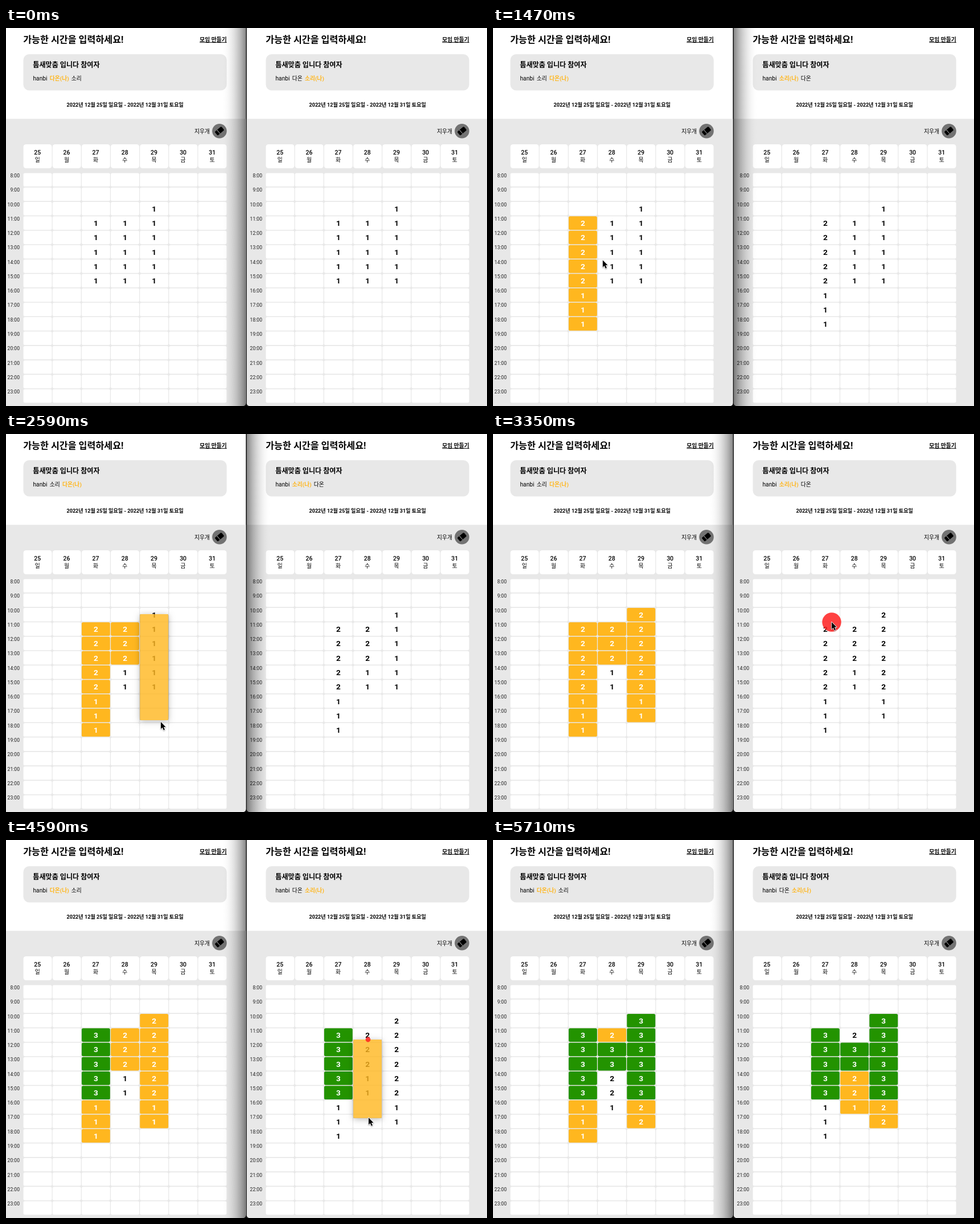
Recreate the animation shown at these times as an HTML page with a canvas. Size 845 by 663 pixels, loop 7000 ms.

```html
<!DOCTYPE html>
<html lang="ko">
<head>
<meta charset="utf-8">
<title>시간 입력</title>
<style>
  html, body { margin: 0; width: 100%; height: 100%; overflow: hidden; background: #000; }
  canvas { display: block; width: 845px; height: 663px; }
</style>
</head>
<body>
<canvas id="stage"></canvas>
<script>
const WIDTH = 845, HEIGHT = 663, LOOP = 7000;
const START = 180, STEP = 1000 / 17;
const YELLOW = '#ffb71f', GREEN = '#239300', GRAY = '#e8e8e8';
const FONT = 'Roboto, "Noto Sans CJK KR", "Noto Sans CJK", sans-serif';
const WINDOW_SHIFT = 426;
const GRID = { x: 30.6, y: 254.4, dx: 51.17, dy: 25.27, w: 49.9, h: 23.7 };
const DAYS = '일월화수목금토';
const NAMES = { first: 'hanbi', left: '다온', right: '소리' };

// Cells already chosen by the third participant: column -> [first row, last row]
const BASE = { 2: [3, 7], 3: [3, 7], 4: [2, 7] };

// drop: own window shows the choice, seen: the other window does
const DRAGS = [
  { win: 0, col: 2, rows: [3, 10], x: 161, y: 324, press: 820, move: 1090, drop: 1320, seen: 1380 },
  { win: 0, col: 3, rows: [3, 5], x: 211, y: 330, press: 1700, move: 1760, drop: 1915, seen: 1975 },
  { win: 0, col: 4, rows: [2, 9], x: 261, y: 316, press: 2290, move: 2370, drop: 2620, seen: 2680 },
  { win: 1, col: 2, rows: [3, 7], x: 595, y: 330, press: 3335, move: 3430, drop: 3910, seen: 3910 },
  { win: 1, col: 3, rows: [4, 8], x: 636, y: 350, press: 4365, move: 4420, drop: 4620, seen: 4680 },
  { win: 1, col: 4, rows: [2, 9], x: 686, y: 303, press: 4990, move: 5060, drop: 5320, seen: 5260 },
];

// Pointer path: time, x, y
const PATH = [
  [150, 425, 620], [760, 161, 324], [1000, 161, 324], [1062, 161, 336], [1260, 160, 529],
  [1340, 162, 528], [1570, 211, 336], [1650, 211, 330], [1740, 211, 330], [1880, 213, 408],
  [1945, 213, 410], [2050, 218, 418], [2260, 261, 316], [2340, 261, 317], [2592, 272, 505],
  [2650, 275, 503], [2840, 780, 246], [3040, 600, 322], [3120, 595, 329], [3400, 595, 330],
  [3700, 596, 458], [3880, 598, 460], [4200, 636, 352], [4400, 636, 350], [4520, 637, 491],
  [4591, 637, 487], [4640, 638, 486], [4930, 686, 303], [5040, 686, 303], [5230, 688, 503],
  [5330, 689, 503], [5650, 416, 622],
];
const POINTER_SHOWN = [150, 5680];
const NAMES_SWAPPED = [1320, 3910];
const LEFT_IN_FRONT = [820, 3335];
const RIPPLE = { life: 300, radius: 18 };

const canvas = document.getElementById('stage');
const ctx = canvas.getContext('2d');
const scale = window.devicePixelRatio || 1;
canvas.width = WIDTH * scale;
canvas.height = HEIGHT * scale;

const within = (t, [from, to]) => t >= from && t < to;
const hasRow = (rows, row) => !!rows && row >= rows[0] && row <= rows[1];

function box(x, y, w, h, r, color) {
  ctx.fillStyle = color;
  ctx.beginPath();
  ctx.roundRect(x, y, w, h, r);
  ctx.fill();
}

function disc(x, y, r, color) {
  ctx.fillStyle = color;
  ctx.beginPath();
  ctx.arc(x, y, r, 0, Math.PI * 2);
  ctx.fill();
}

function text(str, x, y, size, weight = 400, align = 'left', color = '#000') {
  ctx.font = `${weight} ${size}px ${FONT}`;
  ctx.textAlign = align;
  ctx.fillStyle = color;
  ctx.fillText(str, x, y);
  return ctx.measureText(str).width;
}

function pointerAt(t) {
  const i = PATH.findIndex(p => p[0] > t);
  if (i < 0) return PATH[PATH.length - 1].slice(1);
  if (i === 0) return PATH[0].slice(1);
  const [t0, x0, y0] = PATH[i - 1], [t1, x1, y1] = PATH[i];
  const k = (1 - Math.cos(Math.PI * (t - t0) / (t1 - t0))) / 2;
  return [x0 + (x1 - x0) * k, y0 + (y1 - y0) * k];
}

function drawNames(win, t) {
  const me = win ? 'right' : 'left';
  const order = within(t, NAMES_SWAPPED) ? ['right', 'left'] : ['left', 'right'];
  let x = 47.5;
  for (const key of ['first', ...order]) {
    const mine = key === me;
    x += 4.2 + text(NAMES[key] + (mine ? '(나)' : ''), x, 92, key === 'first' ? 10.2 : 9.8,
      mine ? 700 : 400, 'left', mine ? YELLOW : '#000');
  }
}

function drawEraser() {
  text('지우개', 358, 184.8, 9.8, 400, 'right');
  disc(375, 180.7, 12.8, '#737373');
  ctx.save();
  ctx.translate(375, 180.7);
  ctx.rotate(-0.7);
  box(-7.6, -4.2, 15.2, 8.4, 1.6, '#000');
  ctx.fillStyle = '#a5a5a5';
  ctx.fillRect(-2.6, -4.2, 0.9, 8.4);
  ctx.restore();
}

function drawCell(win, col, row, t) {
  const x = GRID.x + col * GRID.dx, y = GRID.y + row * GRID.dy;
  let count = hasRow(BASE[col], row) ? 1 : 0, mine = false;
  for (const d of DRAGS) {
    const shown = t >= (d.win === win ? d.drop : d.seen);
    if (!shown || d.col !== col || !hasRow(d.rows, row)) continue;
    count++;
    mine = mine || d.win === win;
  }
  const fill = count === 3 ? GREEN : mine ? YELLOW : '#fff';
  box(x, y, GRID.w, GRID.h, 2.6, fill);
  if (count) {
    text(count, x + GRID.w / 2, y + 17, 13.6, 700, 'center', fill === '#fff' ? '#000' : '#fff');
  }
}

function drawWindow(win, t) {
  ctx.save();
  ctx.translate(win * WINDOW_SHIFT, 0);
  ctx.beginPath();
  if (win) ctx.roundRect(-3, -20, 460, HEIGHT + 20, 5);
  else ctx.roundRect(-20, -20, 441.4, HEIGHT + 20, 5);
  ctx.clip();
  ctx.fillStyle = '#fff';
  ctx.fillRect(-20, 0, 480, HEIGHT);
  ctx.fillStyle = GRAY;
  ctx.fillRect(-20, 159.3, 480, HEIGHT);

  text('가능한 시간을 입력하세요!', 30.2, 26, 16.2, 700);
  const linkWidth = text('모임 만들기', 387.8, 23.8, 9.8, 700, 'right');
  ctx.fillRect(387.8 - linkWidth, 24.8, linkWidth, 1);
  box(30.5, 46, 357.2, 63.5, 10, GRAY);
  text('틈새맞춤 입니다 참여자', 47.3, 69, 12.1, 700);
  drawNames(win, t);
  text('2022년 12월 25일 일요일 - 2022년 12월 31일 토요일', 209.2, 137.6, 9.1, 700, 'center');
  drawEraser();

  for (let col = 0; col < 7; col++) {
    const x = GRID.x + col * GRID.dx, mid = x + GRID.w / 2 - 0.3;
    box(x, 204, GRID.w, 42, 4.5, '#fff');
    text(25 + col, mid, 222, 10.5, 500, 'center');
    text(DAYS[col], mid, 234.6, 9.8, 500, 'center');
    for (let row = 0; row < 16; row++) drawCell(win, col, row, t);
  }
  for (let row = 0; row < 16; row++) {
    text(`${8 + row}:00`, 24, 262 + row * GRID.dy, 8.6, 400, 'right', '#222');
  }
  ctx.restore();
}

// The front window casts its shadow over the other one.
function drawWindowShadow(leftInFront) {
  const reach = 42, edge = leftInFront ? 423 : 421.4, far = edge + (leftInFront ? reach : -reach);
  const shade = ctx.createLinearGradient(edge, 0, far, 0);
  for (let k = 0; k <= 8; k++) {
    shade.addColorStop(k / 8, `rgba(0,0,0,${0.47 * (1 - k / 8) ** 2})`);
  }
  ctx.fillStyle = shade;
  ctx.fillRect(Math.min(edge, far), 0, reach, HEIGHT);
}

function drawSelection(d, t) {
  if (!within(t, [d.move, d.drop])) return;
  const x = GRID.x + d.col * GRID.dx + d.win * WINDOW_SHIFT;
  const h = Math.max(2, pointerAt(t - 20)[1] - d.y);
  ctx.save();
  ctx.beginPath();
  ctx.rect(0, 0, WIDTH, HEIGHT);
  ctx.roundRect(x, d.y, GRID.w, h, 2);
  ctx.clip('evenodd');
  ctx.shadowColor = 'rgba(0,0,0,.27)';
  ctx.shadowBlur = 11 * scale;
  ctx.shadowOffsetY = 2 * scale;
  box(x, d.y, GRID.w, h, 2, '#000');
  ctx.restore();
  ctx.globalAlpha = 0.8;
  box(x, d.y, GRID.w, h, 2, YELLOW);
  ctx.globalAlpha = 1;
}

function drawRipple(d, t) {
  const k = (t - d.press) / RIPPLE.life;
  if (k >= 0 && k < 1) disc(d.x, d.y, RIPPLE.radius * (1 - k), 'rgba(255,34,34,.86)');
}

const arrow = new Path2D('M0 0V12.2L2.8 9.7L4.9 14.5L7 13.6L4.9 8.9H8.6Z');

function drawPointer(t) {
  if (!within(t, POINTER_SHOWN)) return;
  ctx.save();
  ctx.translate(...pointerAt(t));
  ctx.lineWidth = 1.6;
  ctx.lineJoin = 'round';
  ctx.strokeStyle = '#fff';
  ctx.shadowColor = 'rgba(0,0,0,.35)';
  ctx.shadowBlur = 2 * scale;
  ctx.shadowOffsetY = scale;
  ctx.stroke(arrow);
  ctx.shadowColor = 'transparent';
  ctx.fillStyle = '#000';
  ctx.fill(arrow);
  ctx.restore();
}

function draw(now) {
  const time = now % LOOP;
  const t = time < START ? 0 : START + Math.floor((time - START + 8) / STEP) * STEP;
  ctx.setTransform(scale, 0, 0, scale, 0, 0);
  ctx.fillStyle = '#111';
  ctx.fillRect(0, 0, WIDTH, HEIGHT);
  drawWindow(0, t);
  drawWindow(1, t);
  drawWindowShadow(within(t, LEFT_IN_FRONT));
  DRAGS.forEach(d => drawSelection(d, t));
  DRAGS.forEach(d => drawRipple(d, t));
  drawPointer(t);
}

const begin = performance.now();
function tick() {
  draw(performance.now() - begin);
  requestAnimationFrame(tick);
}
tick();
</script>
</body>
</html>
```
